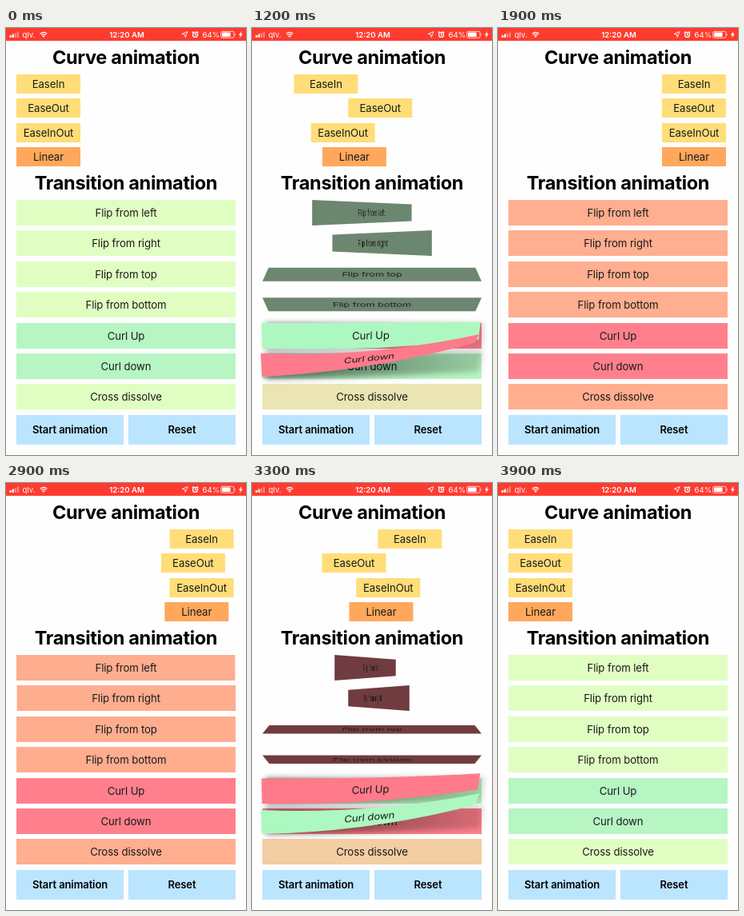
An HTML page that plays this animation: 300 px wide and 534 px high, repeating every 4.4 s.

```html
<!DOCTYPE html>
<html lang="en">
<head>
<meta charset="utf-8">
<title>Curve and transition animation</title>
<style>
  html, body { margin: 0; width: 100%; height: 100%; overflow: hidden; background: #fefefe; }
  body { position: relative; font: 400 13.2px Inter, "Open Sans", sans-serif; letter-spacing: -.1px; color: #1a1a1a; }
  #stage { position: absolute; left: 0; top: 0; width: 300px; height: 534px; overflow: hidden; background: #fefefe; }
  #stage > div, h1, svg { position: absolute; }
  h1 { left: 0; width: 300px; margin: 0; font-size: 23.5px; font-weight: 700; line-height: 30px;
       letter-spacing: -.32px; text-align: center; white-space: nowrap; color: #000; }
  .chip, .row, .btn { display: flex; align-items: center; justify-content: center; white-space: nowrap; }
  .chip { left: 13px; width: 80px; height: 24px; background: #ffdd78; }
  .row { left: 13px; width: 274px; height: 32px; }
  .btn { top: 484px; width: 134px; height: 36px; padding-bottom: 1px; background: #bbe4ff; color: #000;
         font-size: 13px; font-weight: 600; }
  svg { left: 0; top: 0; overflow: visible; }
  .bar text { font-size: 9.6px; letter-spacing: 0; fill: #fff; }
</style>
</head>
<body>
<div id="stage">
  <svg class="bar" width="300" height="16">
    <rect width="300" height="16" fill="#ff3b30"/>
    <g fill="#fff">
      <rect x="4.5" y="9" width="2.2" height="3" rx=".5"/>
      <rect x="7.6" y="7.6" width="2.2" height="4.4" rx=".5"/>
      <rect x="10.7" y="6.2" width="2.2" height="5.8" rx=".5" opacity=".4"/>
      <rect x="13.8" y="4.6" width="2.2" height="7.4" rx=".5" opacity=".4"/>
      <path d="M47 12L45.4 10.2Q47 8.9 48.6 10.2Z"/>
      <rect x="270" y="5.6" width="10.6" height="5.4" rx=".8"/>
      <path d="M286.3 6.8q1.4 1.5 0 3z"/>
      <path d="M294.6 3.8L290.8 8.8H293L292 12.6L296 7.4H293.6Z"/>
    </g>
    <g fill="none" stroke="#fff" stroke-width="1.2">
      <path d="M42.8 7.2Q47 3.6 51.2 7.2M44.3 9Q47 6.7 49.7 9"/>
      <path d="M227 4.6L224.2 11.4L223.4 8.3L220.2 7.4Z" stroke-width=".9"/>
      <circle cx="236.5" cy="8.4" r="3"/>
      <path d="M236.5 6.6V8.6H238M232.8 6L234.6 4.4M240.2 6L238.4 4.4"/>
      <rect x="268.7" y="4.3" width="16.4" height="8" rx="1.8" stroke-width=".8"/>
    </g>
    <text x="20.5" y="11.8">qlv.</text>
    <text x="151" y="11.8" text-anchor="middle" font-weight="600">12:20 AM</text>
    <text x="245.5" y="11.8">64%</text>
  </svg>
  <h1 style="top:22px">Curve animation</h1>
  <h1 style="top:179px">Transition animation</h1>
  <div class="btn" style="left:13px"><span id="start">Start animation</span></div>
  <div class="btn" style="left:153px">Reset</div>
</div>
<script>
const LOOP = 4400, STEP = 100, RUN = 1000, GO = 810, BACK = 2865;
const LEFT = 13, RIGHT = 287, ROW_H = 32, DEPTH = 450, TRAVEL = 192;
const NS = 'http://www.w3.org/2000/svg';
const stage = document.getElementById('stage');
const start = document.getElementById('start');

// Face colours of the two states, plus the shade of each when seen edge-on.
const PALE = [[224, 254, 194], [255, 174, 143]];
const EDGE = [[40, 66, 62], [71, 27, 41]];
const DEEP = [[183, 245, 195], [255, 128, 140]];
const LIT = [[172, 248, 192], [255, 122, 138]];

const clamp = x => Math.min(1, Math.max(0, x));
const lerp = (a, b, k) => a + (b - a) * k;
const mix = (a, b, k) => a.map((v, i) => lerp(v, b[i], k));
const rgb = c => `rgb(${c.map(Math.round)})`;

// Cubic timing curve with handles (x1, 0) and (x2, 1).
function ease(x1, x2) {
  return x => {
    if (x <= 0 || x >= 1) return clamp(x);
    let lo = 0, hi = 1, s = .5;
    for (let i = 0; i < 30; i++) {
      s = (lo + hi) / 2;
      const r = 1 - s;
      if (3 * x1 * s * r * r + 3 * x2 * s * s * r + s * s * s < x) lo = s; else hi = s;
    }
    return s * s * (3 - 2 * s);
  };
}
const easeIn = ease(.42, 1), easeOut = ease(0, .58), easeInOut = ease(.42, .58);

function box(cls, text, top) {
  const el = document.createElement('div');
  el.className = cls;
  el.textContent = text;
  el.style.top = top + 'px';
  stage.append(el);
  return el;
}

const chips = [['EaseIn', easeIn], ['EaseOut', easeOut], ['EaseInOut', easeInOut], ['Linear', x => x]]
  .map(([name, curve], i) => ({ el: box('chip', name, Math.round(57.9 + 30.4 * i)), curve }));
chips[3].el.style.background = '#ffa85c';

const rowTop = i => Math.round(215 + 38.4 * i);
const rows = ['Flip from left', 'Flip from right', 'Flip from top', 'Flip from bottom',
  'Curl Up', 'Curl down', 'Cross dissolve'].map((name, i) => box('row', name, rowTop(i)));
const flips = [['Y', 1], ['Y', -1], ['X', 1], ['X', -1]];

function svg(tag, parent, attrs) {
  const el = document.createElementNS(NS, tag);
  parent.append(el);
  return set(el, attrs);
}
function set(el, attrs) {
  for (const k in attrs) el.setAttribute(k, attrs[k]);
  return el;
}

const layer = svg('svg', stage, { width: 300, height: 534 });
const blur = svg('filter', layer, { id: 'soft', x: '-10%', y: '-60%', width: '120%', height: '220%' });
svg('feGaussianBlur', blur, { stdDeviation: 3.5 });
const dusk = svg('linearGradient', layer, { id: 'dusk' });
svg('stop', dusk, { offset: .1, 'stop-opacity': .55 });
svg('stop', dusk, { offset: 1, 'stop-opacity': .16 });

function makePage(text, row) {
  const g = svg('g', layer, {});
  const shade = svg('path', g, { filter: 'url(#soft)', fill: 'url(#dusk)' });
  const face = svg('path', g, {});
  const label = svg('text', g, { y: 4.8, 'text-anchor': 'middle', fill: '#1a1a1a' });
  label.textContent = text;
  return { g, shade, face, label, top: rowTop(row) };
}
const upPage = makePage('Curl Up', 4), downPage = makePage('Curl down', 5);

// Lift of a sheet: amount, then offsets of TL, BL, TR, BR and sag of top and bottom edge.
const LIFT = [
  [0, 0, 0, 0, 0, 0, 0],
  [.31, 0, 0, -1, -11, 0, 5],
  [.615, 2, 0, -19, -37, 8, 8],
  [.69, -.5, -3, -24.5, -46, 9, 7],
  [1, -8, -38, -36, -67, 2, 2]
];
function liftAt(q) {
  const i = Math.max(1, LIFT.findIndex(k => k[0] >= q));
  const a = LIFT[i - 1], b = LIFT[i];
  return mix(a, b, (q - a[0]) / (b[0] - a[0])).slice(1);
}

function sheet(top, q, lift, m) {
  const [tl, bl, tr, br, st, sb] = lift.map(v => v * m);
  const x0 = LEFT - 3 * q, bottom = top + ROW_H;
  return `M${x0} ${top + tl}Q150 ${top + (tl + tr) / 2 + 2 * st} ${RIGHT - 4.5 * q} ${top + tr}` +
    `L${RIGHT - 12 * q} ${bottom + br}Q150 ${bottom + (bl + br) / 2 + 2 * sb} ${x0 + 2 * q} ${bottom + bl}Z`;
}

function drawPage(page, q, state) {
  page.g.style.display = q > .995 ? 'none' : '';
  if (q > .995) return;
  const lift = liftAt(q), [tl, bl, tr, br, st, sb] = lift;
  const up = clamp(q * 3);
  page.g.style.opacity = clamp((1 - q) / .15);
  set(page.face, { d: sheet(page.top, q, lift, 1), fill: rgb(mix(DEEP[state], LIT[state], up)) });
  set(page.shade, {
    d: sheet(page.top, q, lift, .2), opacity: up, transform: `translate(${5 * up} 0)`
  });
  const yTop = (tl + tr) / 2 + st, yBottom = ROW_H + (bl + br) / 2 + sb;
  const slope = (tr - tl + br - bl) / 2 / (RIGHT - LEFT) * .85;
  const tall = clamp((yBottom - yTop) / ROW_H * 1.3);
  const cx = 150 - 5 * q, cy = page.top + (yTop + yBottom) / 2;
  set(page.label, { transform: `matrix(1 ${slope} ${slope} ${tall} ${cx} ${cy})` });
}

function drawFlip(el, [axis, dir], e, from, to) {
  const half = (axis === 'Y' ? RIGHT - LEFT : ROW_H) / 2;
  const turn = e < .5 ? e : e - 1, state = e < .5 ? from : to;
  const back = half * Math.sin(Math.PI * e);
  el.style.transform = e <= 0 || e >= 1 ? 'none' :
    `perspective(${DEPTH}px) translateZ(${-back}px) rotate${axis}(${180 * dir * turn}deg)`;
  el.style.background = rgb(mix(PALE[state], EDGE[state], 2 * Math.abs(turn)));
}

function draw(now) {
  const t = Math.floor(now % LOOP / STEP) * STEP;
  const from = t < BACK ? 0 : 1, to = 1 - from;
  const p = clamp((t - (from ? BACK : GO)) / RUN);
  const e = easeInOut(p);

  for (const { el, curve } of chips) {
    el.style.transform = `translateX(${TRAVEL * lerp(from, to, curve(p))}px)`;
  }
  flips.forEach((f, i) => drawFlip(rows[i], f, e, from, to));
  rows[4].style.background = rgb(DEEP[to]);
  rows[5].style.background = rgb(DEEP[e < 1 ? from : to]);
  drawPage(upPage, e, from);
  drawPage(downPage, 1 - e, to);
  rows[6].style.background = rgb(mix(PALE[from], PALE[to], e));
  start.style.opacity = t < 800 ? 1 : clamp(.25 + .75 * (t - 800) / 400);
}

let begin;
function tick(now) {
  if (begin === undefined) begin = now;
  draw(now - begin);
  requestAnimationFrame(tick);
}
draw(0);
requestAnimationFrame(tick);
</script>
</body>
</html>
```
